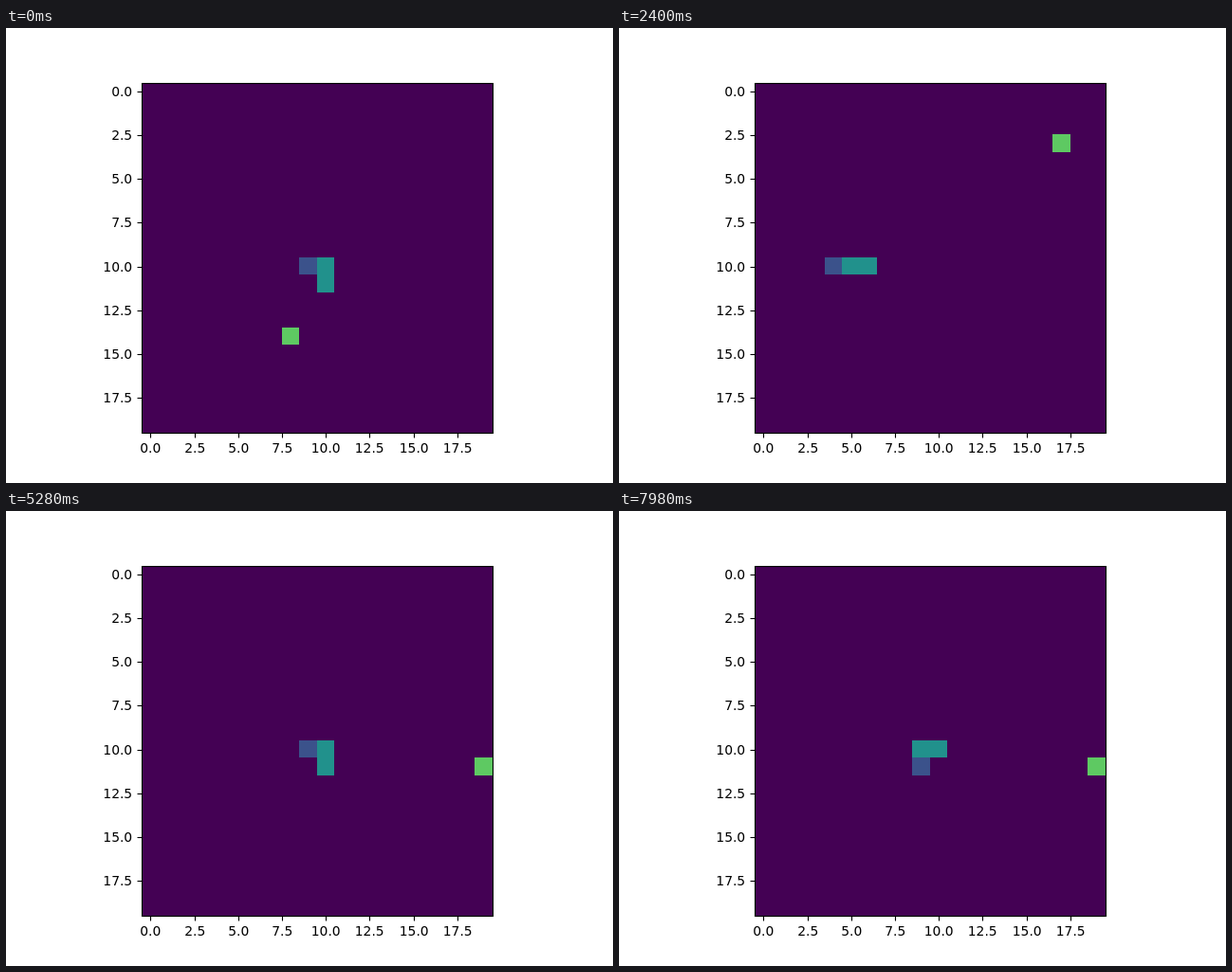
Animation, 640 px wide and 480 px high, one loop 8000 ms. Source, as an HTML page with a canvas:

```html
<!DOCTYPE html>
<html lang="en">
<head>
<meta charset="utf-8">
<title>Snake on a 20 by 20 grid</title>
<style>
  html, body { margin: 0; height: 100%; overflow: hidden; background: #fff; }
  canvas { display: block; }
</style>
</head>
<body>
<canvas id="stage" width="640" height="480"></canvas>
<script>
const ctx = document.getElementById('stage').getContext('2d');
const LOOP = 8000, STEP = 60;
const COLORS = { field: '#440154', head: '#3b528b', body: '#21918c', food: '#5ec962' };
const MOVES = { L: [-1, 0], R: [1, 0], U: [0, -1], D: [0, 1] };

// Each round begins with the snake upright in the middle and ends at a wall.
const rounds = [
  { start: -1, food: [8, 14], moves: 'L' + 'D'.repeat(9) },
  { start: 10, food: [7, 15], moves: 'L' + 'D'.repeat(9) },
  { start: 21, food: [0, 11], moves: 'UL' + 'D'.repeat(10) },
  { start: 34, food: [17, 3], moves: 'L'.repeat(10) },
  { start: 45, food: [18, 9], moves: 'U' + 'L'.repeat(10) + 'D'.repeat(10) },
  { start: 67, food: [19, 11], moves: 'LDRU'.repeat(17) }
];

for (const round of rounds) {
  round.trail = [[10, 12], [10, 11], [10, 10]];
  for (const move of round.moves) {
    const [x, y] = round.trail.at(-1), [dx, dy] = MOVES[move];
    round.trail.push([x + dx, y + dy]);
  }
}

const edgeX = col => Math.floor(143 + 18.5 * col);
const edgeY = row => Math.floor(57 + 18.5 * row);

function cell([col, row], color) {
  const x = edgeX(col), y = edgeY(row);
  ctx.fillStyle = color;
  ctx.fillRect(x, y, edgeX(col + 1) - x, edgeY(row + 1) - y);
}

function line(x1, y1, x2, y2) {
  ctx.beginPath();
  ctx.moveTo(x1, y1);
  ctx.lineTo(x2, y2);
  ctx.stroke();
}

function drawAxes() {
  ctx.strokeStyle = ctx.fillStyle = '#000';
  ctx.lineWidth = 1.11;
  ctx.strokeRect(143.5, 58.5, 370, 369);
  ctx.font = '13.89px "DejaVu Sans", sans-serif';
  for (let value = 0; value < 20; value += 2.5) {
    const offset = 18.48 * (value + 0.5);
    const x = Math.round(143.2 + offset), y = Math.round(57.6 + offset);
    const label = value.toFixed(1);
    line(x + 0.5, 427.5, x + 0.5, 432.5);
    line(138.5, y + 0.5, 143.5, y + 0.5);
    ctx.textAlign = 'center';
    ctx.fillText(label, x + 0.2, 448);
    ctx.textAlign = 'right';
    ctx.fillText(label, 133.2, y + 5);
  }
}

function draw(time) {
  const step = Math.floor((time % LOOP) / STEP);
  const round = rounds.findLast(r => r.start <= step);
  const age = step - round.start;
  const [tail, middle, head] = round.trail.slice(age, age + 3);

  ctx.fillStyle = '#fff';
  ctx.fillRect(0, 0, 640, 480);
  ctx.fillStyle = COLORS.field;
  ctx.fillRect(143, 58, 370, 369);
  cell(round.food, COLORS.food);
  cell(tail, COLORS.body);
  cell(middle, COLORS.body);
  cell(head, COLORS.head);
  drawAxes();
}

const begin = performance.now();
function tick() {
  draw(performance.now() - begin);
  requestAnimationFrame(tick);
}
tick();
</script>
</body>
</html>
```
